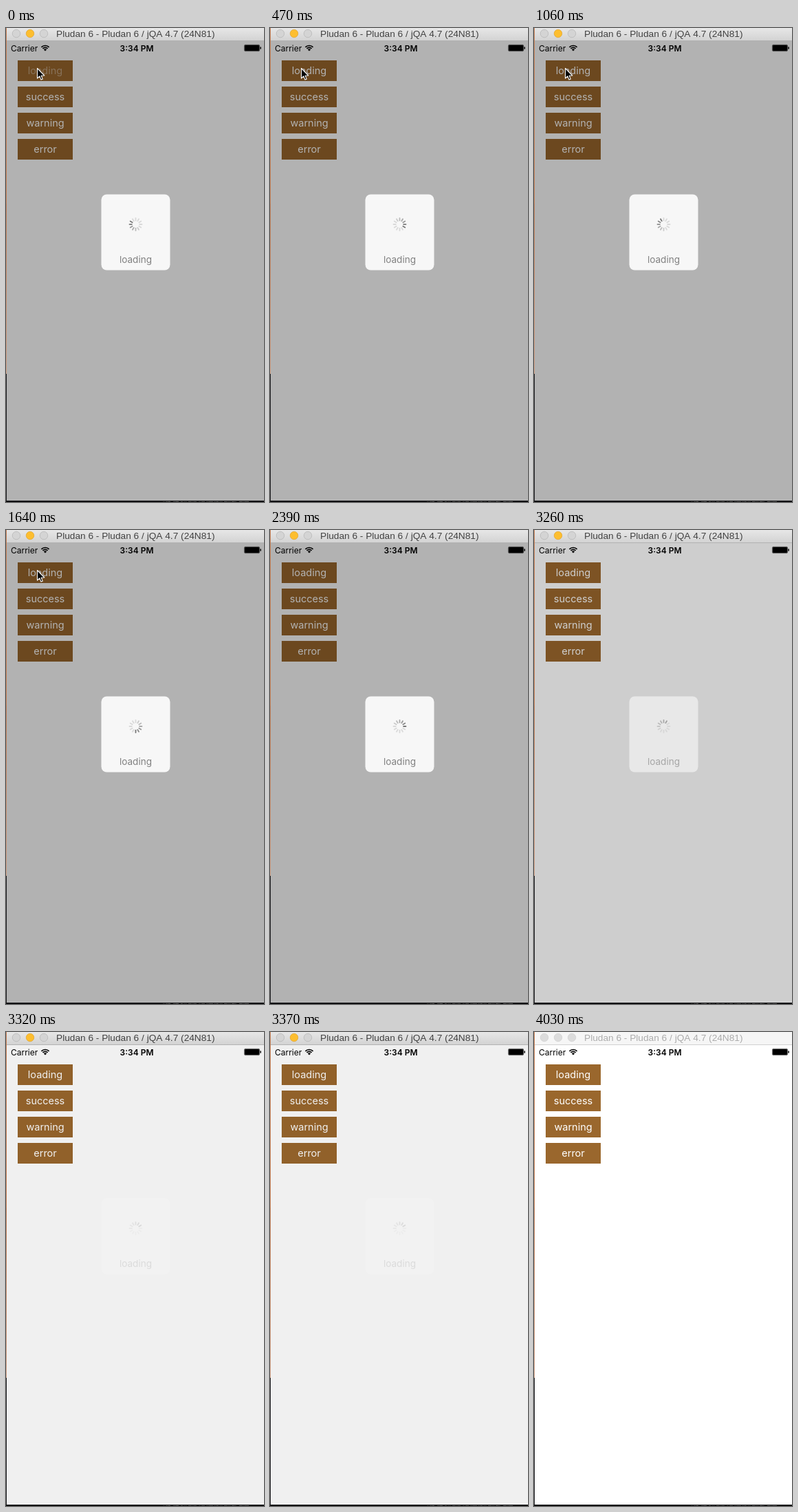
Write an HTML page with a canvas that moves like this. It is 375x688 px and loops after 4750 ms.

```html
<!DOCTYPE html>
<html lang="en">
<head>
<meta charset="utf-8">
<title>Loading overlay</title>
<style>
html, body { margin: 0; width: 100%; height: 100%; overflow: hidden; background: #fff; }
canvas { display: block; width: 375px; height: 688px; }
</style>
</head>
<body>
<canvas id="stage"></canvas>
<script>
const W = 375, H = 688, LOOP = 4750;
const TICK = 58.15, TICK_START = 2;
const BLUR_AT = 4030;
const UI = 'Inter, "Open Sans", sans-serif';
const TITLE = '"Liberation Sans", Arial, sans-serif';

const canvas = document.getElementById('stage');
const ctx = canvas.getContext('2d');
const dpr = window.devicePixelRatio || 1;
canvas.width = W * dpr;
canvas.height = H * dpr;
ctx.scale(dpr, dpr);

const gray = v => `rgb(${v},${v},${v})`;

function rect(x, y, w, h, fill) {
  ctx.fillStyle = fill;
  ctx.fillRect(x, y, w, h);
}

function round(x, y, w, h, r, fill) {
  ctx.beginPath();
  ctx.roundRect(x, y, w, h, r);
  ctx.fillStyle = fill;
  ctx.fill();
}

function text(str, x, y, font, fill, align = 'center') {
  ctx.font = font;
  ctx.textAlign = align;
  ctx.fillStyle = fill;
  ctx.fillText(str, x, y);
}

function vertical(y0, y1, from, to) {
  const g = ctx.createLinearGradient(0, y0, 0, y1);
  g.addColorStop(0, from);
  g.addColorStop(1, to);
  return g;
}

function drawDesktop() {
  rect(0, 0, 1, 255, '#c17a50');
  rect(0, 255, 1, 247, vertical(255, 502, '#b9764f', '#c99a80'));
  rect(0, 502, 1, 186, '#151518');
  rect(0, 686, W, 2, '#111113');
  for (let i = 0; i < 24; i++) {
    const x = 228 + (i * 37) % 122;
    rect(x, 687, 3 + i % 4, 1, gray(45 + (i * 29) % 45));
  }
}

function drawTitleBar(active) {
  rect(1, 0, W - 1, 18, active ? vertical(0, 18, gray(231), gray(211)) : gray(246));
  rect(1, 18, W - 1, 1, gray(active ? 178 : 209));
  [15, 35, 55].forEach((x, i) => {
    const lit = active && i === 1;
    ctx.beginPath();
    ctx.arc(x, 8, 5.75, 0, Math.PI * 2);
    ctx.fillStyle = lit ? '#fdbe2f' : gray(active ? 212 : 220);
    ctx.fill();
    ctx.lineWidth = 0.7;
    ctx.strokeStyle = lit ? '#e0a32a' : gray(active ? 180 : 206);
    ctx.stroke();
  });
  text('Pludan 6 - Pludan 6 / jQA 4.7 (24N81)', 73, 13, `13.7px ${TITLE}`,
    gray(active ? 66 : 172), 'left');
}

function drawStatusBar() {
  text('Carrier', 7, 33.5, `12px ${UI}`, '#000', 'left');
  text('3:34 PM', 190, 33.5, `600 12px ${UI}`, '#000');

  // Wi-Fi
  const a = -Math.PI * 0.75, b = -Math.PI * 0.25;
  ctx.strokeStyle = ctx.fillStyle = '#000';
  ctx.lineWidth = 1.7;
  for (const r of [7.9, 5]) {
    ctx.beginPath();
    ctx.arc(57, 33.4, r, a, b);
    ctx.stroke();
  }
  ctx.beginPath();
  ctx.moveTo(57, 33.6);
  ctx.arc(57, 33.4, 3, a, b);
  ctx.fill();

  // Battery
  ctx.lineWidth = 0.6;
  ctx.beginPath();
  ctx.roundRect(346.4, 24.4, 22.2, 9.2, 1.6);
  ctx.stroke();
  round(347, 25, 21, 8, 1, '#000');
  round(369.3, 27.2, 1.5, 3.6, 0.8, '#000');
}

function drawButtons(pressed) {
  ['loading', 'success', 'warning', 'error'].forEach((label, i) => {
    const y = 47 + i * 38;
    rect(17, y, 80, 30, '#9a672d');
    const alpha = i ? 1 : pressed;
    text(label, 57, y + 20.3, `14.5px ${UI}`, `rgba(255,255,255,${alpha})`);
  });
}

function drawSpinner(lead) {
  ctx.save();
  ctx.translate(188.5, 285);
  ctx.lineWidth = 1.8;
  ctx.lineCap = 'round';
  for (let i = 0; i < 12; i++) {
    const age = (lead - i + 120) % 12;
    ctx.strokeStyle = `rgba(112,112,112,${Math.max(0.22, 0.95 - age * 0.125)})`;
    ctx.beginPath();
    ctx.moveTo(0, -5.6);
    ctx.lineTo(0, -9);
    ctx.stroke();
    ctx.rotate(Math.PI / 6);
  }
  ctx.restore();
}

function drawHud(lead) {
  round(138.5, 241.5, 100, 110, 8, gray(247));
  drawSpinner(lead);
  text('loading', 188.5, 340.5, `13.6px ${UI}`, gray(128));
}

function drawCursor() {
  ctx.save();
  ctx.translate(45.5, 58.5);
  ctx.beginPath();
  ctx.moveTo(0, 0);
  ctx.lineTo(0, 14.6);
  ctx.lineTo(3.3, 11.5);
  ctx.lineTo(5.5, 16.6);
  ctx.lineTo(7.8, 15.6);
  ctx.lineTo(5.7, 10.7);
  ctx.lineTo(10.3, 10.5);
  ctx.closePath();
  ctx.lineWidth = 1.1;
  ctx.lineJoin = 'round';
  ctx.fillStyle = '#000';
  ctx.fill();
  ctx.strokeStyle = '#fff';
  ctx.stroke();
  ctx.restore();
}

function fadeOut(tick) {
  const u = Math.min(1, Math.max(0, (tick - 54.615) * 0.2955));
  return 0.5 + 0.5 * Math.cos(Math.PI * u);
}

function draw(t) {
  // The screen refreshes on a fixed tick, the spinner turns once a second.
  const tick = Math.max(0, Math.floor((t - TICK_START) / TICK));
  const lead = 10 + Math.ceil(tick * 0.69843 - 0.25);
  const shown = fadeOut(tick);

  rect(0, 0, W, H, '#fff');
  drawButtons(Math.min(1, 0.4 + tick * 0.2));
  rect(1, 19, W - 1, 667, `rgba(0,0,0,${0.302 * shown})`);
  drawStatusBar();

  if (shown > 0.01) {
    // Fade the panel as one layer, so blend its parts by clipping to alpha.
    ctx.globalAlpha = shown;
    drawHud(lead);
    ctx.globalAlpha = 1;
  }

  drawTitleBar(t < BLUR_AT);
  drawDesktop();
  if (tick < 30) drawCursor();
}

const start = performance.now();
function frame() {
  draw((performance.now() - start) % LOOP);
  requestAnimationFrame(frame);
}
draw(0);
requestAnimationFrame(frame);
</script>
</body>
</html>
```
